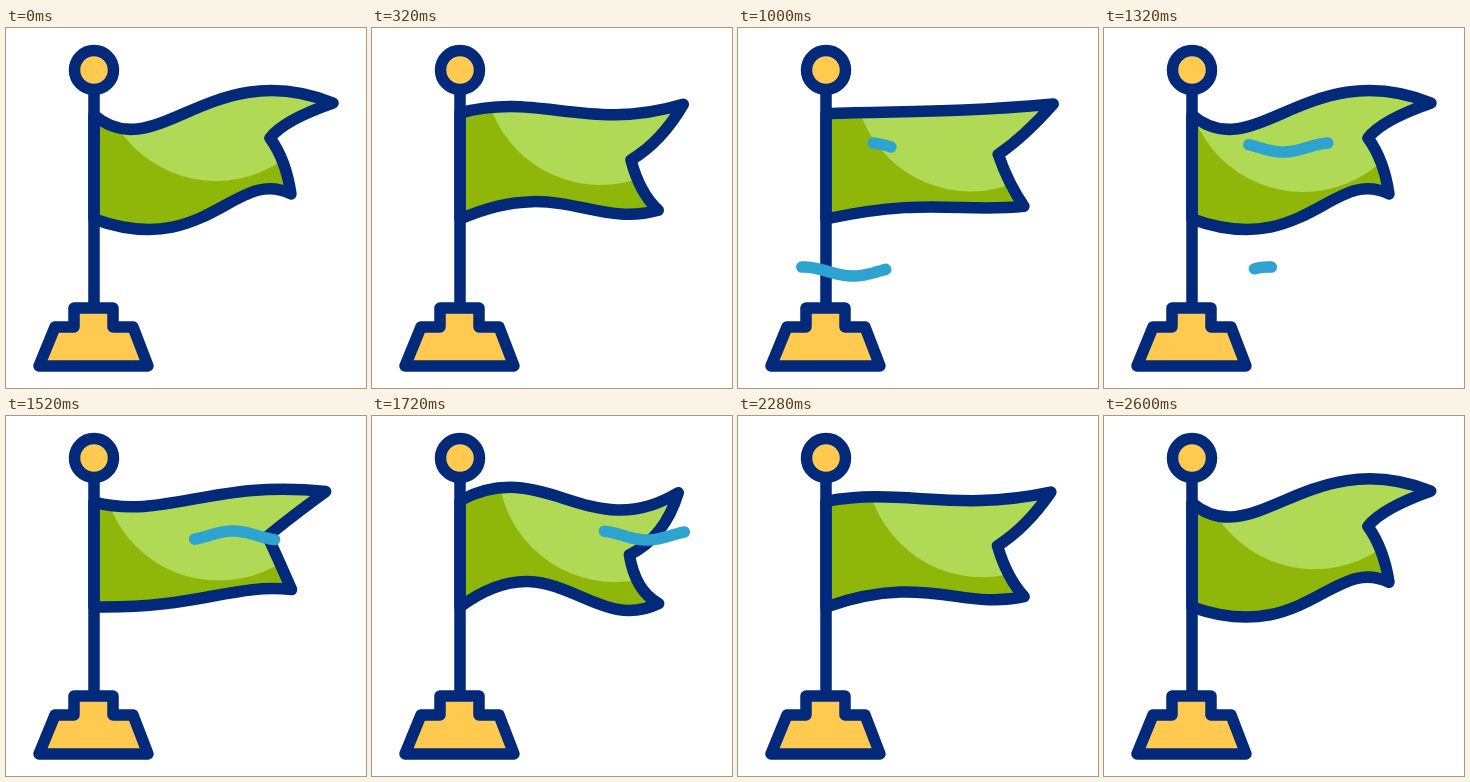
These frames come from a looping animation (360x360 px, 2640 ms). An HTML page with a canvas:

```html
<!DOCTYPE html>
<html lang="en">
<head>
<meta charset="utf-8">
<title>Waving flag</title>
<style>
  html, body { margin: 0; width: 100%; height: 100%; overflow: hidden; background: #fff; }
  canvas { display: block; width: 360px; height: 360px; }
</style>
</head>
<body>
<canvas id="stage" width="360" height="360"></canvas>
<script>
const ctx = document.getElementById('stage').getContext('2d');
const LOOP = 2640, WAVE = LOOP / 2, STEP = 40, RISE = 550, FALL = 665;
const NAVY = '#02297a', YELLOW = '#ffca4f', GREEN = '#8fb709', LIME = '#b0da55', BLUE = '#2fa3cf';

// Each edge starts where the one before ends; the last point is its end.
const LOW = {
  start: [88, 87],
  top: [150, 140, 205, 26, 327, 75],
  tip: [278, 92, 264, 110],
  notch: [280, 132, 285, 166],
  bottom: [230, 138, 200, 232, 88, 191]
};
const HIGH = {
  start: [88, 84],
  top: [178, 18, 220, 152, 302, 77],
  tip: [296, 127, 256, 145],
  notch: [260, 184, 287, 192],
  bottom: [216, 238, 178, 98, 88, 191]
};

// A light disc swings back and forth behind the flag outline.
const DISC_RADIUS = 117;
const DISC_SWINGS = [
  { at: 0, centre: [210, 36] },
  { at: 740, centre: [257, 46] },
  { at: 1320, centre: [199, 47] },
  { at: 2000, centre: [268, 50] },
  { at: LOOP, centre: [210, 36] }
];

// Head and tail cross the span at a steady pace between their two times.
const GUSTS = [
  { span: [-12, 168], head: [335, 1083], tail: [720, 1385], y: 243.5, crest: 65, period: 100 },
  { span: [135, 322], head: [915, 1760], tail: [1275, 2130], y: 119.5, crest: 131, period: 96 }
];

const mix = (a, b, k) => a + (b - a) * k;
const mixAll = (a, b, k) => a.map((v, i) => mix(v, b[i], k));
const progress = (t, from, to) => Math.min(1, Math.max(0, (t - from) / (to - from)));
const ease = k => (1 - Math.cos(Math.PI * k)) / 2;

function lift(t) {
  const p = t % WAVE;
  return ease(progress(p, 0, RISE)) - ease(progress(p, WAVE - FALL, WAVE));
}

function flagPath(t) {
  const k = lift(t), path = new Path2D();
  const edge = name => mixAll(LOW[name], HIGH[name], k);
  path.moveTo(...edge('start'));
  path.bezierCurveTo(...edge('top'));
  path.quadraticCurveTo(...edge('tip'));
  path.quadraticCurveTo(...edge('notch'));
  path.bezierCurveTo(...edge('bottom'));
  path.closePath();
  return path;
}

function discPath(t) {
  const next = DISC_SWINGS.findIndex(swing => swing.at > t);
  const from = DISC_SWINGS[next - 1], to = DISC_SWINGS[next];
  const centre = mixAll(from.centre, to.centre, ease(progress(t, from.at, to.at)));
  const path = new Path2D();
  path.arc(...centre, DISC_RADIUS, 0, Math.PI * 2);
  return path;
}

function paint(path, fill) {
  ctx.fillStyle = fill;
  ctx.fill(path);
  ctx.stroke(path);
}

function drawFlag(t) {
  const flag = flagPath(t);
  ctx.save();
  ctx.clip(flag);
  ctx.fillStyle = GREEN;
  ctx.fillRect(0, 0, 360, 360);
  ctx.fillStyle = LIME;
  ctx.fill(discPath(t));
  ctx.restore();
  ctx.stroke(flag);
}

function drawStand() {
  ctx.stroke(new Path2D('M88 62V280'));
  const ball = new Path2D();
  ball.arc(88, 42, 19.5, 0, Math.PI * 2);
  paint(ball, YELLOW);
  paint(new Path2D('M33 338L49 299H68V280H107V299H127L142 338Z'), YELLOW);
}

function drawGust({ span, head, tail, y, crest, period }, t) {
  const front = mix(...span, progress(t, ...head));
  const back = mix(...span, progress(t, ...tail));
  if (front <= back) return;
  ctx.beginPath();
  for (let x = back; x <= front; x++) {
    ctx.lineTo(x, y - 4.5 * Math.cos(2 * Math.PI * (x - crest) / period));
  }
  ctx.stroke();
}

function frame() {
  const t = Math.floor(performance.now() % LOOP / STEP) * STEP;
  ctx.fillStyle = '#fff';
  ctx.fillRect(0, 0, 360, 360);
  ctx.lineWidth = 11.5;
  ctx.lineCap = ctx.lineJoin = 'round';
  ctx.strokeStyle = NAVY;
  drawFlag(t);
  drawStand();
  ctx.strokeStyle = BLUE;
  GUSTS.forEach(gust => drawGust(gust, t));
  requestAnimationFrame(frame);
}
frame();
</script>
</body>
</html>
```
